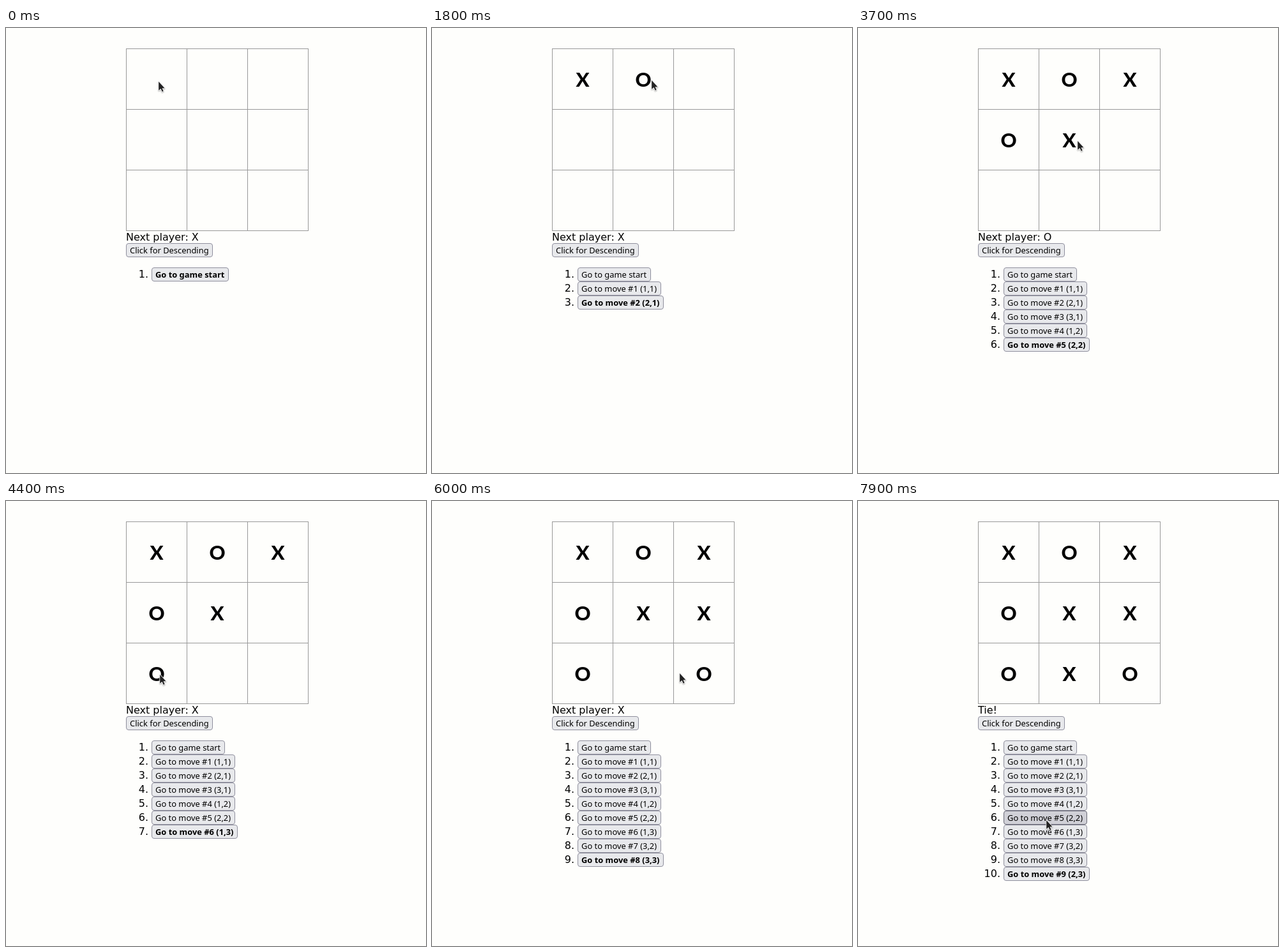
An HTML page with a canvas for the animation above (8 s loop, 658x697 px).

```html
<!DOCTYPE html>
<html lang="en">
<head>
<meta charset="utf-8">
<title>Tic-tac-toe</title>
<style>
  html, body { margin: 0; width: 100%; height: 100%; overflow: hidden; background: #fefefc; }
  canvas { display: block; }
</style>
</head>
<body>
<canvas id="stage" width="658" height="697"></canvas>
<script>
const ctx = document.getElementById('stage').getContext('2d');
const LOOP = 8000;
const STEP = 100;
const BOARD = { x: 188, y: 32, cell: 95 };
const LIST = { x: 228, y: 375, row: 22 };
const TEXT = '16px "DejaVu Sans", sans-serif';
const LABEL = '12.9px "Noto Sans", sans-serif';
const MARK = '800 31px Lato, sans-serif';

// Cells in the order they are played, and when each is clicked
const order = [...'012346587'].map(Number);
const clicks = [1000, 1600, 2300, 3200, 3700, 4400, 5100, 6000, 6700];
const moves = order.map((cell, i) => ({ time: clicks[i], col: cell % 3, row: Math.floor(cell / 3) }));

// The pointer glides from stop to stop: start time, number of steps, x, y
const home = [238, 82];
const stops = [
  [1100, 2, 325, 80],
  [1800, 3, 418, 80],
  [2400, 3, 276, 177],
  [3200, 1, 319, 175],
  [3400, 1, 343, 175],
  [3800, 3, 240, 270],
  [4500, 2, 384, 183],
  [4800, 1, 402, 178],
  [5300, 4, 387, 268],
  [6200, 3, 322, 273],
  [7600, 4, 294, 498]
];

function pointerAt(time) {
  return stops.reduce(([x, y], [start, steps, toX, toY]) => {
    const progress = (Math.floor((time - start) / STEP) + 1) / steps;
    const eased = Math.min(1, Math.max(0, progress)) ** 1.5;
    return [Math.round(x + (toX - x) * eased), Math.round(y + (toY - y) * eased)];
  }, home);
}

function write(text, x, y, font, align = 'left') {
  ctx.font = font;
  ctx.textAlign = align;
  ctx.fillStyle = '#000';
  ctx.fillText(text, x, y);
}

function drawButton(text, x, y, [mx, my], bold = false) {
  const font = (bold ? 'bold ' : '') + LABEL;
  ctx.font = font;
  const width = Math.ceil(ctx.measureText(text).width) + 12;
  const hover = mx >= x && mx < x + width && my >= y && my < y + LIST.row;
  ctx.beginPath();
  ctx.roundRect(x + 0.5, y + 0.5, width - 1, LIST.row - 1, 3.5);
  ctx.fillStyle = hover ? '#d0d0d7' : '#e8e9ec';
  ctx.strokeStyle = hover ? '#676774' : '#8f8f9d';
  ctx.lineWidth = 1;
  ctx.fill();
  ctx.stroke();
  write(text, x + 6, y + 16, font);
}

function drawBoard(played) {
  const { x, y, cell } = BOARD;
  ctx.fillStyle = '#999';
  for (let i = 0; i < 4; i++) {
    ctx.fillRect(x + i * cell, y, 1, 3 * cell + 1);
    ctx.fillRect(x, y + i * cell, 3 * cell + 1, 1);
  }
  played.forEach(({ col, row }, i) => {
    write(i % 2 ? 'O' : 'X', x + (col + 0.5) * cell + 0.5, y + row * cell + 60, MARK, 'center');
  });
}

function drawHistory(played, mouse) {
  const labels = ['Go to game start', ...played.map(
    ({ col, row }, i) => `Go to move #${i + 1} (${col + 1},${row + 1})`
  )];
  labels.forEach((label, i) => {
    const y = LIST.y + i * LIST.row;
    write(`${i + 1}.`, LIST.x - 5, y + 16, TEXT, 'right');
    drawButton(label, LIST.x, y, mouse, i === played.length);
  });
}

const arrow = new Path2D('M1.2 2V15.8L4.5 12.9L6.7 17.8L8.7 17L6.6 12.2H10.6Z');

function drawPointer([x, y]) {
  ctx.save();
  ctx.translate(x, y);
  ctx.lineJoin = 'round';
  ctx.lineWidth = 1.6;
  ctx.strokeStyle = '#fff';
  ctx.shadowColor = 'rgba(0, 0, 0, 0.35)';
  ctx.shadowBlur = 2;
  ctx.shadowOffsetY = 1;
  ctx.stroke(arrow);
  ctx.shadowColor = 'transparent';
  ctx.fillStyle = '#222';
  ctx.fill(arrow);
  ctx.restore();
}

function draw(time) {
  const played = moves.filter(move => move.time <= time);
  const mouse = pointerAt(time);
  const status = played.length === 9 ? 'Tie!' : `Next player: ${played.length % 2 ? 'O' : 'X'}`;

  ctx.fillStyle = '#fefefc';
  ctx.fillRect(0, 0, 658, 697);
  drawBoard(played);
  write(status, 188, 333, TEXT);
  drawButton('Click for Descending', 188, 337, mouse);
  drawHistory(played, mouse);
  drawPointer(mouse);
}

const origin = performance.now();
function tick() {
  draw((performance.now() - origin) % LOOP);
  requestAnimationFrame(tick);
}
tick();
</script>
</body>
</html>
```
